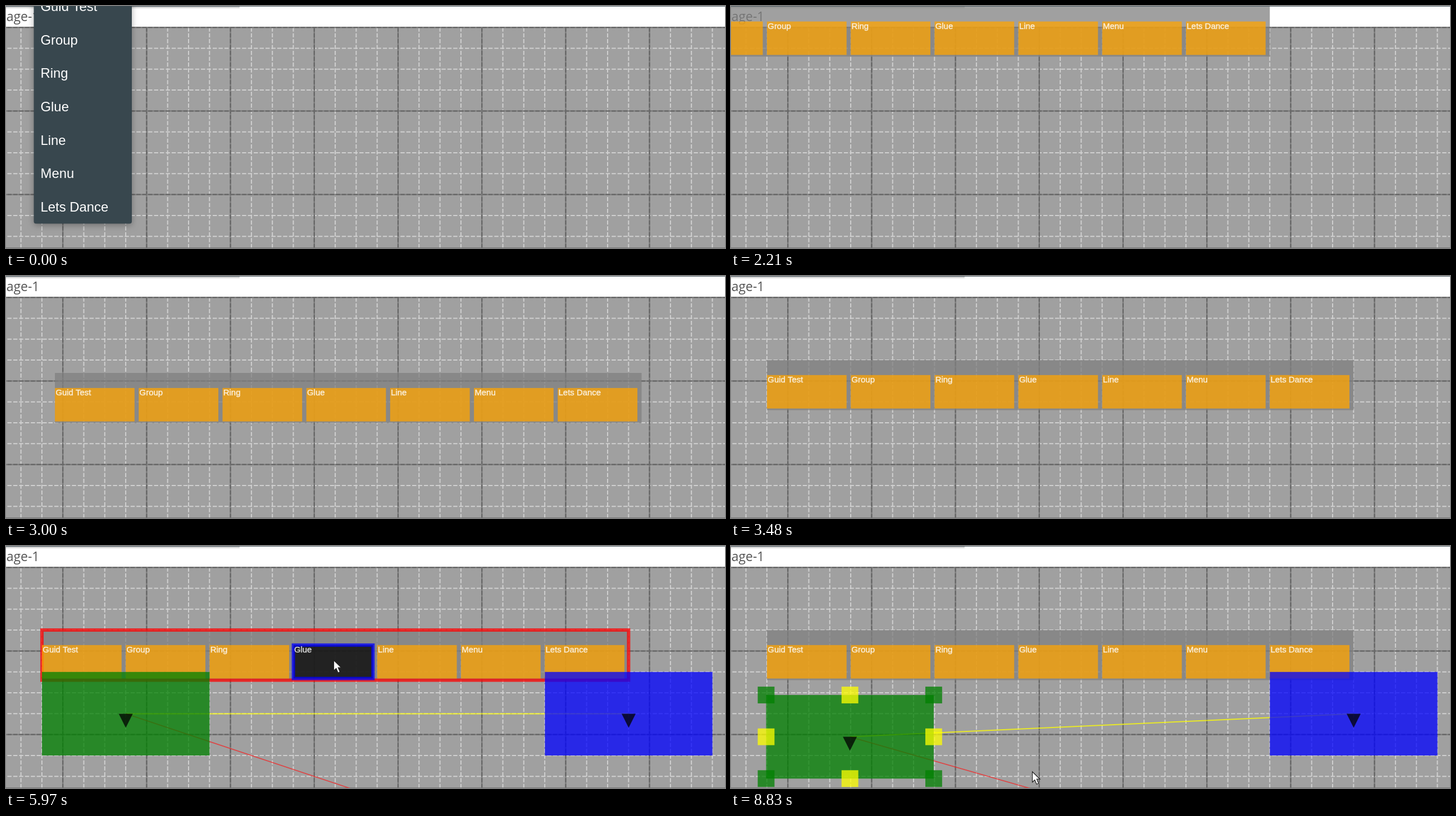
An HTML page with a canvas for the animation above (8.89 s loop, 1280 by 432 pixels).

```html
<!DOCTYPE html>
<html lang="en">
<head>
<meta charset="utf-8">
<title>Radial menu demo</title>
<style>
  html, body { margin: 0; width: 100%; height: 100%; overflow: hidden; background: #a0a0a0; }
  canvas { display: block; width: 100%; height: 100%; }
</style>
</head>
<body>
<canvas id="stage" width="1280" height="432"></canvas>
<script>
const ctx = document.getElementById('stage').getContext('2d');
const W = 1280, H = 432, LOOP = 8890;
const UNIT = 1.492, CELL = 25 * UNIT, ALPHA = 0.75;
const ITEMS = ['Guid Test', 'Group', 'Ring', 'Glue', 'Line', 'Menu', 'Lets Dance'];
const SANS = '"Liberation Sans", Arial, sans-serif';

const GROUP = { x: 64, y: 150, w: 700 * UNIT, h: 60 * UNIT };
const TILE = { w: 95 * UNIT, h: 40 * UNIT, dy: 18 * UNIT, pitch: 100 * UNIT };
const BOX = { w: 200 * UNIT, h: 100 * UNIT };
const BLUE_BOX = { x: 959.3, y: 224.8, ...BOX };
const RED_TARGET = { x: 1108.5, y: 598 };
const MENU = { x: 49.5, w: 174.5, bottom: 388.5, row: 40 * UNIT };

const TIMES = {
  menuGone: 1770, travelFrom: 2290, travelMid: 2772, travelTo: 3480,
  boxesIn: 5970, grab: 7190, drop: 8150
};

// Key points: [time, x, y]
const CURSOR_VISITS = [
  [[200, 150, -10], [620, 128, 150], [1070, 102, 294], [1130, 98, 296],
   [1780, 98, 296], [2150, 240, 440]],
  [[4480, 642, 440], [4900, 610, 345], [5370, 586, 260], [5440, 584, 245],
   [5700, 583, 204], [6240, 583, 204], [6700, 360, 238], [7120, 107, 283],
   [7190, 107, 283], [7500, 108, 318], [7880, 106, 324], [8480, 106, 324],
   [8830, 536, 403], [LOOP, 536, 403]]
];
const GREEN_PATH = [[7130, 64, 224.8], [7500, 66.7, 250], [7880, 62.5, 266]];
const PRESSES = [[1590, 1700], [5760, 5970], [7130, 8150]];

function follow(keys, t) {
  const i = keys.findIndex(key => key[0] > t);
  if (i === 0) return { x: keys[0][1], y: keys[0][2] };
  if (i < 0) { const last = keys[keys.length - 1]; return { x: last[1], y: last[2] }; }
  const [a, b] = [keys[i - 1], keys[i]];
  const p = (t - a[0]) / (b[0] - a[0]);
  return { x: a[1] + (b[1] - a[1]) * p, y: a[2] + (b[2] - a[2]) * p };
}

// Elastic in-out around the middle of the travel, 0 to 1
function elastic(t) {
  if (t < TIMES.travelFrom) return 0;
  if (t >= TIMES.travelTo) return 1;
  const step = Math.floor((t - 2790) / 72 + 1e-6) * 72 + 2790;
  const u = (step - TIMES.travelMid) / 1000;
  const wave = 0.5 * 2 ** (-10 * Math.abs(u)) * Math.cos(2 * Math.PI * u / 0.36);
  return u < 0 ? wave : 1 - wave;
}

const within = (p, r) => p && p.x >= r.x && p.x <= r.x + r.w && p.y >= r.y && p.y <= r.y + r.h;
const centre = r => ({ x: r.x + r.w / 2, y: r.y + r.h / 2 });

function fillRect(r, color) {
  ctx.fillStyle = color;
  ctx.fillRect(r.x, r.y, r.w, r.h);
}

function outline(r, color) {
  ctx.strokeStyle = color;
  ctx.lineWidth = 4 * UNIT;
  ctx.strokeRect(r.x, r.y, r.w, r.h);
}

function line(a, b, color, width, dash = []) {
  ctx.strokeStyle = color;
  ctx.lineWidth = width;
  ctx.setLineDash(dash);
  ctx.beginPath();
  ctx.moveTo(a.x, a.y);
  ctx.lineTo(b.x, b.y);
  ctx.stroke();
  ctx.setLineDash([]);
}

function gridLine(a, b, major) {
  if (major) {
    line(a, b, '#7c7c7c', 2.4);
    line(a, b, '#646464', 2, [5 * UNIT, 2 * UNIT]);
  } else {
    line(a, b, '#cfcfcf', 2, [5 * UNIT, 2 * UNIT]);
  }
}

function drawGrid() {
  const top = 38.2;
  const each = major => {
    for (let i = -2; i < 33; i++) {
      const x = 101.2 + i * CELL;
      if ((i % 4 === 0) === major) gridLine({ x, y: top }, { x, y: H }, major);
    }
    for (let i = 0; i < 11; i++) {
      const y = top + i * CELL;
      if ((i % 4 === 0) === major) gridLine({ x: -8, y }, { x: W, y }, major);
    }
  };
  each(false);
  each(true);
  line({ x: 0, y: 431.5 }, { x: W, y: 431.5 }, '#777', 1);
}

function drawPage() {
  fillRect({ x: 0, y: 0, w: W, h: H }, '#a0a0a0');
  drawGrid();
  fillRect({ x: 0, y: 0, w: W, h: 37 }, '#fff');
  const shade = ctx.createLinearGradient(0, 0, 0, 5);
  shade.addColorStop(0, 'rgba(0,0,0,.35)');
  shade.addColorStop(1, 'rgba(0,0,0,0)');
  fillRect({ x: 0, y: 0, w: 416, h: 5 }, shade);
  fillRect({ x: 0, y: 0, w: W, h: 1 }, '#4d5c64');
  ctx.font = '23px "Open Sans", "Noto Sans", sans-serif';
  ctx.textAlign = 'right';
  ctx.fillStyle = '#555';
  ctx.fillText('Page-1', 59.5, 26.5);
  ctx.textAlign = 'left';
}

function drawGroup(t, cursor, green) {
  const shift = (elastic(t) - 1) * TILE.pitch;
  const group = { ...GROUP, x: GROUP.x + shift, y: GROUP.y + shift };
  const covered = t >= TIMES.boxesIn && within(cursor, green);
  const hovered = t >= TIMES.travelTo && t < TIMES.grab && !covered && within(cursor, group);

  ctx.save();
  ctx.beginPath();
  ctx.rect(0, 1, W, H);
  ctx.clip();
  ctx.globalAlpha = ALPHA;
  fillRect(group, '#808080');
  if (hovered) outline(group, '#f00');
  ctx.font = `${10 * UNIT}px ${SANS}`;
  ITEMS.forEach((label, i) => {
    const tile = { x: group.x + i * TILE.pitch, y: group.y + TILE.dy, w: TILE.w, h: TILE.h };
    const active = hovered && within(cursor, tile);
    fillRect(tile, active ? '#000' : '#ffa500');
    if (active) outline(tile, '#00f');
    ctx.fillStyle = ctx.strokeStyle = '#fff';
    ctx.lineWidth = 0.5;
    ctx.fillText(label, tile.x + 1.3, tile.y + 13.4);
    ctx.strokeText(label, tile.x + 1.3, tile.y + 13.4);
  });
  ctx.restore();
}

function drawBox(box, color) {
  fillRect(box, color);
  const { x, y } = centre(box);
  ctx.fillStyle = '#000';
  ctx.beginPath();
  ctx.moveTo(x - 12.5, y);
  ctx.lineTo(x + 12.5, y);
  ctx.lineTo(x, y + 25);
  ctx.fill();
}

function drawHandles(box) {
  const size = 20 * UNIT;
  for (let i = 0; i < 3; i++) {
    for (let j = 0; j < 3; j++) {
      if (i === 1 && j === 1) continue;
      const x = box.x + box.w * i / 2 - size / 2;
      const y = box.y + box.h * j / 2 - size / 2;
      fillRect({ x, y, w: size, h: size }, i === 1 || j === 1 ? '#ff0' : '#008000');
    }
  }
}

function drawBoxes(t, cursor, green) {
  ctx.save();
  ctx.globalAlpha = ALPHA;
  line(centre(green), centre(BLUE_BOX), '#ff0', 2);
  line(centre(green), RED_TARGET, '#f02828', 1.7);
  drawBox(green, '#008000');
  drawBox(BLUE_BOX, '#00f');
  if (t >= TIMES.grab) drawHandles(green);
  else if (within(cursor, green)) outline(green, '#f00');
  ctx.restore();
}

function drawMenu(t, cursor) {
  ctx.save();
  ctx.globalAlpha = Math.min(1, Math.max(0, (TIMES.menuGone - t) / 110));
  ctx.shadowColor = 'rgba(0,0,0,.3)';
  ctx.shadowBlur = 12;
  ctx.shadowOffsetY = 3;
  ctx.fillStyle = '#38474e';
  ctx.beginPath();
  ctx.roundRect(MENU.x, -40, MENU.w, MENU.bottom + 40, 4);
  ctx.fill();
  ctx.shadowColor = 'transparent';
  ctx.font = `${16 * UNIT}px ${SANS}`;
  ITEMS.forEach((label, i) => {
    const row = { x: MENU.x, y: MENU.bottom - (7 - i) * MENU.row, w: MENU.w, h: MENU.row };
    if (within(cursor, row)) fillRect(row, 'rgba(255,255,255,.1)');
    ctx.fillStyle = '#fff';
    ctx.fillText(label, 61.5, row.y + 38.2);
  });
  ctx.restore();
}

const ARROW = new Path2D('M0 0V18.5L4.3 14.5L7.6 22.3L11 20.8L7.8 13.2H13.6Z');

function drawCursor(t, { x, y }) {
  if (PRESSES.some(([from, to]) => t >= from && t < to)) {
    ctx.fillStyle = 'rgba(255,255,0,.52)';
    ctx.beginPath();
    ctx.arc(x, y, 14.5, 0, 2 * Math.PI);
    ctx.fill();
  }
  ctx.save();
  ctx.translate(x + 0.5, y);
  ctx.fillStyle = '#fff';
  ctx.strokeStyle = '#222';
  ctx.lineWidth = 1.2;
  ctx.fill(ARROW);
  ctx.stroke(ARROW);
  ctx.restore();
}

function render(t) {
  const visit = CURSOR_VISITS.find(keys => t >= keys[0][0] && t <= keys[keys.length - 1][0]);
  const cursor = visit && follow(visit, t);
  const green = { ...follow(GREEN_PATH, t), ...BOX };

  drawPage();
  if (t >= TIMES.menuGone) drawGroup(t, cursor, green);
  if (t >= TIMES.boxesIn) drawBoxes(t, cursor, green);
  if (t < TIMES.menuGone) drawMenu(t, cursor);
  if (cursor) drawCursor(t, cursor);
}

function tick() {
  render(performance.now() % LOOP);
  requestAnimationFrame(tick);
}
tick();
</script>
</body>
</html>
```
